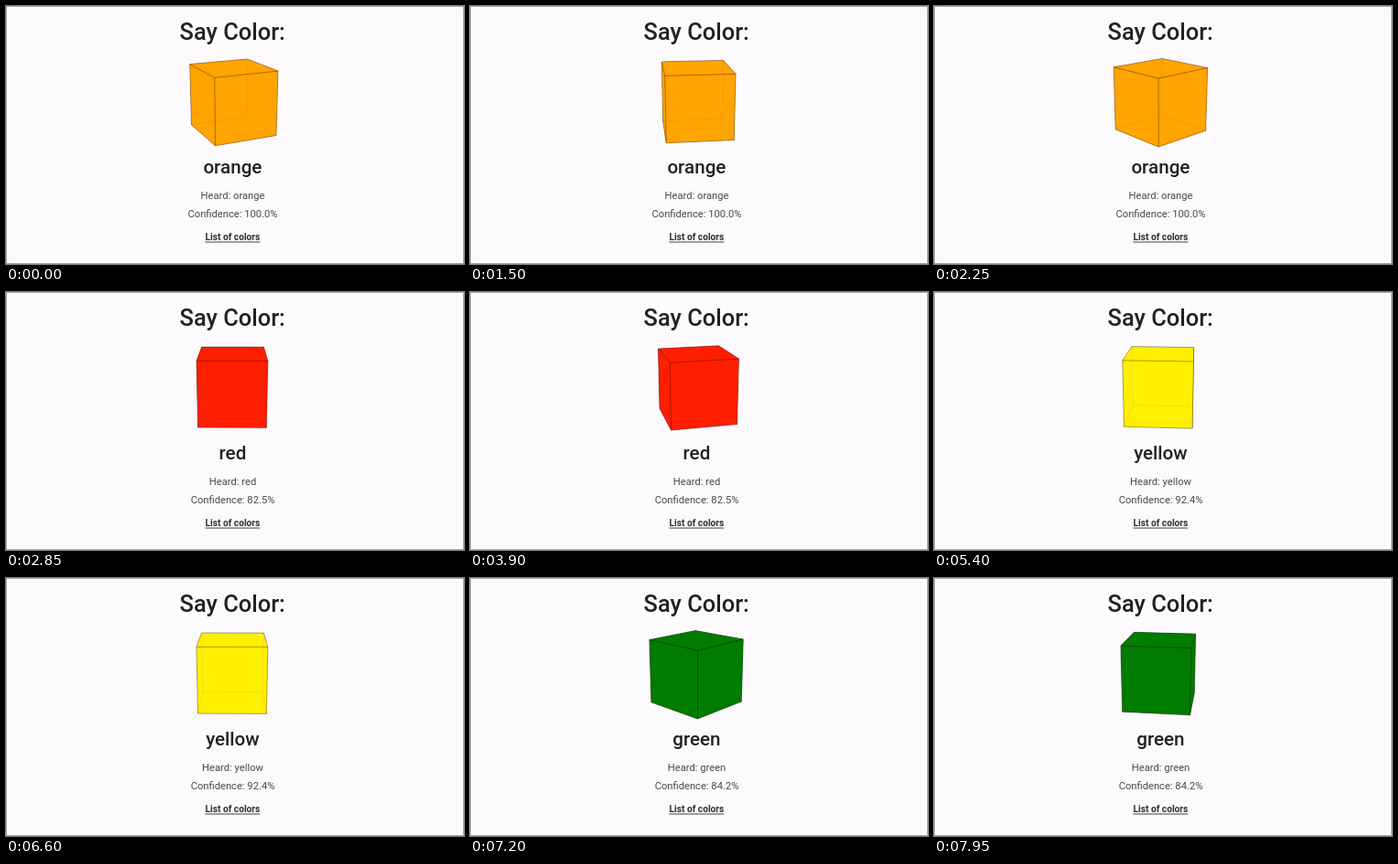
Animation, 500 px wide and 282 px high, one loop 8000 ms. Source, as an HTML page:

```html
<!DOCTYPE html>
<html lang="en">
<head>
<meta charset="utf-8">
<title>Say Color</title>
<style>
  html, body { margin: 0; width: 100%; height: 100%; overflow: hidden; background: #fcfafd; }
  svg { display: block; width: 100%; height: 100%; }
  text { font-family: Roboto, sans-serif; text-anchor: middle; fill: #212121; }
  .title { font-size: 25.4px; font-weight: 500; }
  .name { font-size: 20.6px; font-weight: 500; }
  .detail { font-size: 11.2px; fill: #484848; }
  .link { font-size: 10.2px; font-weight: 700; fill: #303030; }
  polygon { stroke: #200000; stroke-opacity: .3; stroke-width: .8; stroke-linejoin: round; }
</style>
</head>
<body>
<svg viewBox="0 0 500 282">
  <rect x=".5" y=".5" width="499" height="281" fill="#fcfafd" stroke="#a0a0a0"/>
  <text class="title" x="247.2" y="37">Say Color:</text>
  <g id="cube"></g>
  <text class="name" id="name" x="247.4" y="183"></text>
  <text class="detail" id="heard" x="247.5" y="211"></text>
  <text class="detail" id="confidence" x="247.5" y="231"></text>
  <text class="link" x="247.4" y="256.2">List of colors</text>
  <path d="M217.4 258H277.4" stroke="#404040"/>
</svg>
<script>
const LOOP = 8000;
const CENTER = { x: 247.2, y: 102 };
const HALF = 35.5, PERSPECTIVE = 500;
const START_ANGLE = 24.8, DEGREES_PER_SECOND = -72, TILT = 16;

const phases = [
  { from: 0, name: 'orange', confidence: '100.0', fill: '#ffa500' },
  { from: 2350, name: 'red', confidence: '82.5', fill: '#ff2000' },
  { from: 4700, name: 'yellow', confidence: '92.4', fill: '#fff000' },
  { from: 7100, name: 'green', confidence: '84.2', fill: '#007c00' }
];

// Corner index bits: 1 = right, 2 = top, 4 = front.
const corners = Array.from({ length: 8 }, (_, i) =>
  [1, 2, 4].map(bit => (i & bit ? HALF : -HALF)));
const faces = [
  [4, 6, 7, 5], [0, 1, 3, 2], [5, 7, 3, 1],
  [0, 2, 6, 4], [6, 2, 3, 7], [0, 4, 5, 1]
];

const byId = id => document.getElementById(id);
const radians = degrees => degrees * Math.PI / 180;
const cube = byId('cube');
const polygons = faces.map(() =>
  cube.appendChild(document.createElementNS('http://www.w3.org/2000/svg', 'polygon')));

function project([x, y, z], angle) {
  const turnedX = x * Math.cos(angle) + z * Math.sin(angle);
  const turnedZ = z * Math.cos(angle) - x * Math.sin(angle);
  const tilt = radians(TILT);
  const up = y * Math.cos(tilt) - turnedZ * Math.sin(tilt);
  const depth = turnedZ * Math.cos(tilt) + y * Math.sin(tilt);
  const scale = PERSPECTIVE / (PERSPECTIVE - depth);
  return [CENTER.x + turnedX * scale, CENTER.y - up * scale];
}

function facesViewer([a, b, c]) {
  return (b[0] - a[0]) * (c[1] - a[1]) - (b[1] - a[1]) * (c[0] - a[0]) > 0;
}

function drawCube(time, fill) {
  const angle = radians(START_ANGLE + DEGREES_PER_SECOND * time / 1000);
  const points = corners.map(corner => project(corner, angle));
  const outlines = faces
    .map(face => face.map(i => points[i]))
    .map(outline => ({ outline, front: facesViewer(outline) }))
    .sort((a, b) => a.front - b.front);
  outlines.forEach(({ outline, front }, i) => {
    polygons[i].setAttribute('points', outline.map(p => p.map(v => v.toFixed(2))).join(' '));
    polygons[i].setAttribute('fill', fill);
    // Slightly translucent front faces let the far edges show through.
    polygons[i].setAttribute('fill-opacity', front ? 0.84 : 1);
  });
}

let shown;
function showText(phase) {
  if (phase === shown) return;
  shown = phase;
  byId('name').textContent = phase.name;
  byId('heard').textContent = `Heard: ${phase.name}`;
  byId('confidence').textContent = `Confidence: ${phase.confidence}%`;
}

const start = performance.now();
function render() {
  const time = (performance.now() - start) % LOOP;
  const phase = phases.findLast(p => time >= p.from);
  drawCube(time, phase.fill);
  showText(phase);
  requestAnimationFrame(render);
}
render();
</script>
</body>
</html>
```
